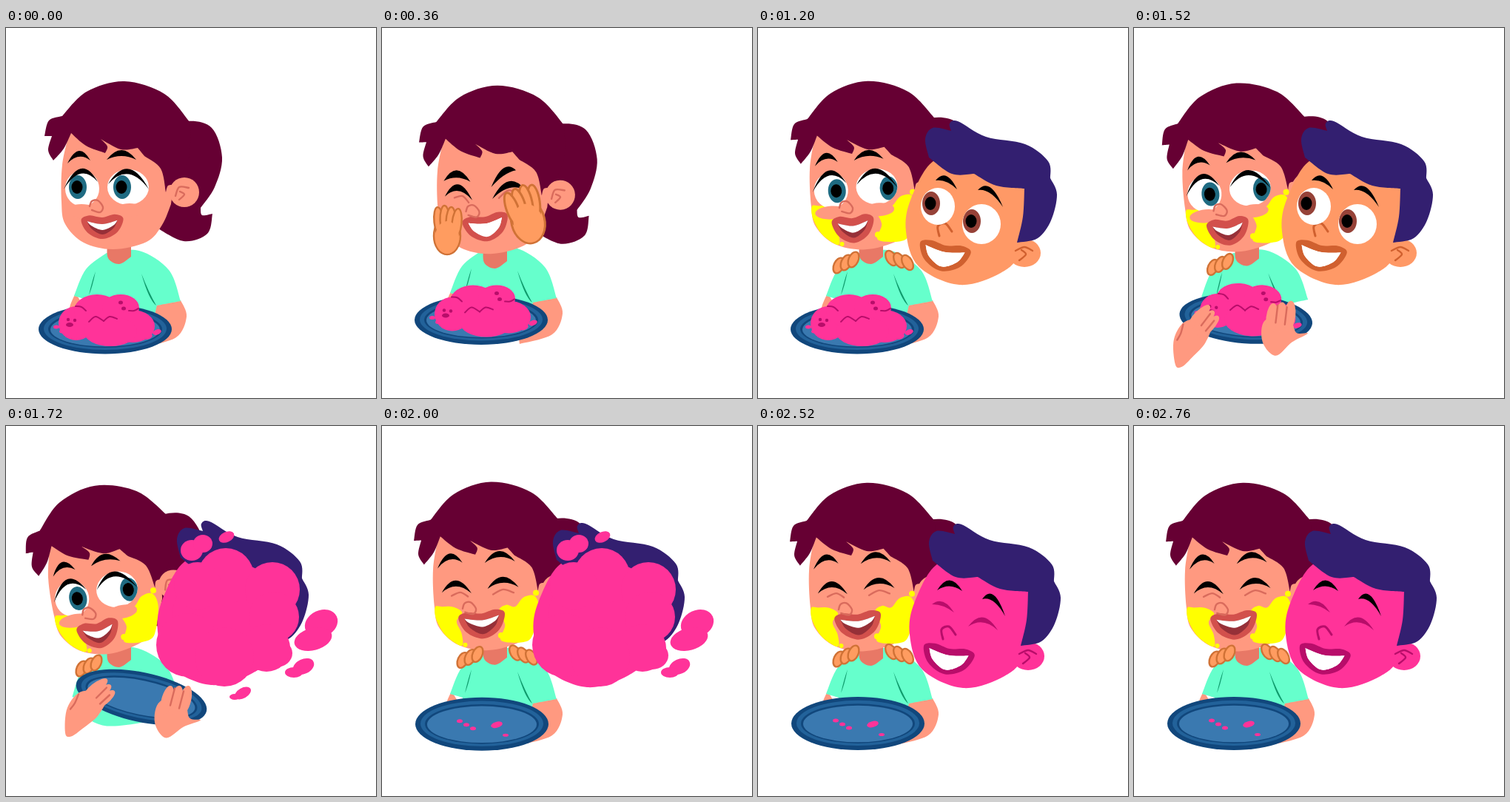
Recreate the animation shown at these times as an HTML page. Size 500 by 500 pixels, loop 2.8 s.

```html
<!DOCTYPE html>
<html lang="en">
<head>
<meta charset="utf-8">
<title>Colour play</title>
<style>
html, body { margin: 0; width: 100%; height: 100%; overflow: hidden; background: #fff; }
svg { display: block; width: 100vw; height: 100vh; }
#boy { --face: #ff9966; --edge: #d0602f; }
#boy.painted { --face: #ff3399; --edge: #b80d6a; }
</style>
</head>
<body>
<svg id="stage" viewBox="0 0 500 500" xmlns="http://www.w3.org/2000/svg"></svg>
<script>
const LOOP = 2800, STEP = 40;
const HAIR = '#660033', SKIN = '#ff9980', SHADE = '#d96b5c', LIP = '#d2504c', MOUTH = '#963038';
const TAN = '#ff9c60', TAN_LINE = '#d07236', PINK = '#ff3399', BERRY = '#b80d6a', SUN = '#ffff00';
const NAVY = '#11477c', BLUE = '#22629a', SKY = '#3a79b0', MINT = '#66ffcc', LEAF = '#0f9b6c', INDIGO = '#331f70';
const FACE = 'var(--face)', EDGE = 'var(--edge)';

// ---- drawing helpers ----
const style = (fill, line, w = 2.4) => `style="fill:${fill};stroke:${line || 'none'};stroke-width:${w};stroke-linecap:round"`;
const group = (id, ...parts) => `<g id="${id}">${parts.join('')}</g>`;
const oval = (fill, x, y, rx, ry = rx, rot = 0, line) =>
  `<ellipse cx="${x}" cy="${y}" rx="${rx}" ry="${ry}" transform="rotate(${rot} ${x} ${y})" ${style(fill, line)}/>`;

// smooth curve through points; a slash marks a sharp corner
function curve(text) {
  const runs = text.split('/').map(run => {
    const n = run.trim().split(/\s+/).map(Number);
    return n.flatMap((v, i) => i % 2 ? [] : [[v, n[i + 1]]]);
  });
  const loop = runs.length === 1;
  let d = `M${runs[0][0]}`, last;
  for (const run of runs) {
    const p = last ? [last, ...run] : run, n = p.length;
    const at = i => loop ? p[(i + n) % n] : p[Math.max(0, Math.min(n - 1, i))];
    for (let i = 0; i < (loop ? n : n - 1); i++) {
      const [a, b, c, e] = [-1, 0, 1, 2].map(k => at(i + k));
      const h1 = b.map((v, k) => v + (c[k] - a[k]) / 6), h2 = c.map((v, k) => v - (e[k] - b[k]) / 6);
      d += `C${h1} ${h2} ${c}`;
    }
    last = p[n - 1];
  }
  return d;
}
const area = (fill, text, line) => `<path d="${curve(text)}Z" ${style(fill, line)}/>`;
const line = (color, text, w) => `<path d="${curve(text + ' /' + text.trim().split(/\s+/).slice(-2).join(' '))}" ${style('none', color, w)}/>`;

// crescent between two points
function arch(x1, y1, x2, y2, rise, thick, fill = '#000') {
  const x = (x1 + x2) / 2, y = (y1 + y2) / 2 - 2 * rise;
  return `<path d="M${x1} ${y1}Q${x} ${y} ${x2} ${y2}Q${x} ${y + 2 * thick} ${x1} ${y1}Z" ${style(fill)}/>`;
}

// eyeball with an iris clipped to it
function eye(id, x, y, rx, ry, ix, iy, color) {
  return `<clipPath id="${id}Clip"><ellipse cx="${x}" cy="${y}" rx="${rx}" ry="${ry}"/></clipPath>` +
    oval('#fff', x, y, rx, ry) +
    `<g clip-path="url(#${id}Clip)">` +
    group(id, oval(color, ix, iy, 12, 16), oval('#000', ix - 1, iy, 7.5, 9)) + '</g>';
}

// smiling mouth hung from the middle of its upper lip
function mouth(id, x, y, w, h, tilt, lip, inside, bite) {
  const a = w / 2, b = a - 8;
  const bowl = (k, c) => `${-b} 5 0 9 ${b} 4 / ${b * .72} ${c * .65} 0 ${c} ${-b * .72} ${c * .65} ${-b} 5 / ${-b} 5`;
  return `<g transform="translate(${x} ${y}) rotate(${tilt})">` + group(id,
    area(lip, `${-a} 3 ${-a * .6} -3 0 0 ${a * .6} -4 ${a} 2 ${a * .7} ${h * .7} 0 ${h} ${-a * .7} ${h * .7}`),
    area(inside, bowl(1, h - 6)), area('#fff', bowl(1, bite))) + '</g>';
}

function hand(id) {
  let s = '';
  for (let i = 0; i < 4; i++) s += oval(TAN, -11 + 8 * i, -13 + 2 * Math.abs(i - 1), 6.5, 20, 4 * i - 6, TAN_LINE);
  return group(id, oval(TAN, 0, 8, 18, 25, 0, TAN_LINE), s, oval(TAN, 0, 10, 16, 22));
}

function row(n, x, y, dx, dy, rx, ry, rot, fill, edge) {
  let s = '';
  for (let i = 0; i < n; i++) s += oval(fill, x + i * dx, y + i * dy, rx, ry, rot, edge);
  return s;
}

// ---- the picture ----
const girlHead = group('head',
  area(SKIN, '86 140 76 185 75 235 80 265 105 290 145 299 190 289 211 266 223 238 / 230 190 / 200 140 / 86 140'),
  area(HAIR, '52 146 58 125 76 119 / 109 86 160 72 214 89 249 128 / 247 175 228 212 / 219 213 216 222 / 209 190 187 173 / 178 162 / 155 164 128 150 / 137 160 134 169 / 108 159 88 142 / 78 163 64 179 / 57 165 62 146 / 52 146'),
  oval(SKIN, 241, 222, 20), line(SHADE, '229 227 234 215 247 216'), line(SHADE, '235 221 241 225 234 232'),
  group('smear', oval(SUN, 100, 264, 18, 36, 8), oval(SUN, 191, 257, 25, 33, -12)),
  group('paint',
    area(SUN, '76 237 86 237 100 238 112 246 104 258 110 275 109 291 89 277 77 255'),
    area(SUN, '162 246 172 239 184 242 196 230 211 229 216 246 208 276 196 290 163 287 169 266'),
    oval(SUN, 213, 225, 4), oval(SUN, 114, 290, 3), oval(SUN, 163, 280, 4)),
  group('openFace',
    arch(83, 183, 114, 179, 15, 8), arch(136, 178, 176, 178, 13, 8),
    eye('irisL', 103, 217, 23, 24, 97, 215, '#1f6b82'), eye('irisR', 165, 215, 28, 24, 157, 215, '#1f6b82'),
    oval(SKIN, 102, 247, 22, 9), oval(SKIN, 167, 246, 20, 9),
    arch(78, 218, 124, 208, 23, 7), arch(138, 211, 193, 218, 24, 7)),
  mouth('smile', 130, 256, 57, 29, -1, LIP, MOUTH, 17),
  group('squintFace',
    group('squeezeL', arch(84, 199, 120, 201, 15, 10), arch(85, 220, 122, 226, 19, 9), line(SHADE, '98 222 109 220 117 229')),
    group('squeezeR', arch(148, 209, 182, 187, 14, 10), arch(149, 225, 193, 213, 17, 9), line(SHADE, '158 224 171 214 186 219')),
    mouth('grin', 138, 249, 62, 33, -7, LIP, '#fff', 26)),
  group('laughFace',
    arch(82, 185, 116, 179, 16, 8), arch(146, 181, 187, 181, 15, 8),
    arch(86, 218, 126, 221, 17, 8), arch(148, 216, 190, 216, 15, 8),
    line(SHADE, '99 223 111 219 121 225'), line(SHADE, '155 224 169 218 183 223'),
    mouth('laugh', 138, 249, 63, 34, -2, LIP, MOUTH, 18)),
  line(SHADE, '113 241 116 234 124 233 131 242 127 249 116 246'));

const body = group('body',
  group('restArms',
    area(SKIN, '204 362 / 236 368 / 244 390 230 418 186 431 / 182 395 / 204 362'),
    area(SKIN, '94 358 / 86 378 88 394 / 112 388 / 94 358')),
  area(MINT, '136 304 108 326 92 362 / 109 367 / 110 390 130 403 160 405 194 399 204 375 / 236 369 / 220 327 180 301 136 304'),
  arch(112, 361, 121, 329, 2, 5, LEAF), arch(183, 332, 203, 375, -2, 5, LEAF));

const plate = group('plate',
  group('dish', oval(NAVY, 0, 0, 90, 33.5), oval(BLUE, 0, -.5, 83, 28.5), oval(NAVY, 0, 0, 77, 25), oval(SKY, 0, .5, 74, 23)),
  group('crumbs', row(3, -30, -4, 9, 5, 4, 2.5, 0, PINK), oval(PINK, 20, 1, 8, 4, -15), oval(PINK, 32, 15, 4, 2)),
  group('pile',
    row(3, -66, -3, 8, 6, 4, 2.5, 0, PINK), row(2, 70, 4, -12, 6, 6, 3.5, -20, PINK),
    oval(PINK, -39, -8, 24, 23), oval(PINK, -11, -25, 31, 22), oval(PINK, 21, -29, 25, 18),
    oval(PINK, 37, -4, 30, 22), oval(PINK, 7, 3, 36, 20),
    line(BERRY, '-40 -31 -32 -30 -26 -25', 2), line(BERRY, '-22 -10 -13 -17 -2 -11', 2),
    line(BERRY, '-2 -11 6 -17 16 -14', 2), line(BERRY, '45 -28 39 -25 32 -25', 2),
    oval(BERRY, -48, -6, 5, 3), row(2, -50, -13, 9, 1, 2.2, 2.2, 0, BERRY), row(2, 21, -36, 4, 8, 3, 2.5, 0, BERRY)));

const throwHands = group('throwHands',
  area(SKIN, '80 414 83 380 103 358 135 365 125 390 104 408 88 419'),
  row(3, 121, 354, 5, 8, 20, 7, -38, SKIN), line(SHADE, '136 353 122 367'), line(SHADE, '140 363 127 375'), line(SHADE, '98 362 93 374 87 382'),
  area(SKIN, '201 400 208 372 240 372 248 394 263 397 240 406 216 421'),
  row(3, 218, 370, 12, 0, 8, 20, 14, SKIN), line(SHADE, '228 354 222 377'), line(SHADE, '240 358 234 381'));

const boy = group('boy',
  oval(FACE, 360, 304, 22, 19),
  area(FACE, '240 178 207 230 200 275 217 322 272 347 328 331 354 300 362 220 300 180'),
  line(EDGE, '348 301 360 296 371 301'), line(EDGE, '356 300 362 306 353 314'),
  area(INDIGO, '231 175 226 150 236 135 261 139 / 259 129 270 126 308 147 361 157 392 180 395 203 / 404 225 396 260 378 284 350 290 / 358 255 360 217 / 322 213 292 197 / 262 197 231 175'),
  line(EDGE, '245 281 243 268 253 264 262 275', 3),
  mouth('boySmile', 254, 294, 70, 35, 12, EDGE, '#fff', 29),
  group('boyOpen', arch(240, 206, 269, 218, 12, 8), arch(297, 219, 331, 242, 15, 8),
    eye('boyL', 243, 241, 23, 25, 234, 237, '#964238'), eye('boyR', 302, 265, 26, 27, 289, 261, '#964238')),
  group('boyLaugh', arch(237, 215, 271, 216, 14, 8), arch(298, 227, 329, 250, 17, 9),
    arch(230, 234, 260, 245, 9, 6, EDGE), arch(279, 264, 319, 269, 15, 7, EDGE)));

const splat = group('splat',
  oval(PINK, 302, 262, 78), oval(PINK, 297, 203, 38), oval(PINK, 360, 221, 37), oval(PINK, 259, 216, 32),
  oval(PINK, 362, 258, 34), oval(PINK, 246, 296, 43), oval(PINK, 352, 300, 32), oval(PINK, 295, 312, 40),
  oval(PINK, 251, 168, 15, 14), oval(PINK, 266, 159, 13, 12), oval(PINK, 298, 150, 11, 7, -25),
  oval(PINK, 426, 267, 23, 18, -25), oval(PINK, 415, 288, 26, 15, -15),
  oval(PINK, 402, 325, 15, 10, -25), oval(PINK, 389, 333, 12, 7));

document.getElementById('stage').innerHTML = [
  group('behind'),
  group('backHair', area(HAIR, '215 140 / 245 126 278 135 292 175 282 215 263 243 / 265 253 279 251 / 272 278 240 288 204 270 / 215 140')),
  body, group('neck', area('#e87866', '137 290 / 138 311 153 319 169 309 / 169 290 / 137 290')),
  girlHead, hand('rubL'), hand('rubR'),
  group('gripL', row(3, 109, 321, 10, -4, 6.5, 11, 24, TAN, TAN_LINE)),
  group('gripR', row(3, 180, 311, 11, 3, 6.5, 11, -30, TAN, TAN_LINE)),
  group('front', boy), plate, throwHands, splat,
  group('drop', oval(PINK, 320, 361, 12, 7, -30), oval(PINK, 309, 366, 7, 4))
].join('');

// ---- motion helpers ----
const el = id => document.getElementById(id);
const show = (id, on) => { el(id).style.display = on ? '' : 'none'; };
const put = (id, x, y, rot = 0, sx = 1, sy = sx, px = 0, py = 0) =>
  el(id).setAttribute('transform', `translate(${x + px} ${y + py}) rotate(${rot}) scale(${sx} ${sy}) translate(${-px} ${-py})`);
const part = (t, a, b) => Math.max(0, Math.min(1, (t - a) / (b - a)));
const ramp = (t, a, b) => { const p = part(t, a, b); return p * p * (3 - 2 * p); };
const bump = (t, a, b) => Math.sin(Math.PI * part(t, a, b));

function draw(now) {
  const t = Math.floor((now % LOOP) / STEP) * STEP;
  const squint = ramp(t, 120, 280) - ramp(t, 1040, 1200);
  const toss = ramp(t, 1440, 1640) - ramp(t, 1760, 1920);
  const settle = ramp(t, 1760, 1920);
  const laugh = settle * (.5 + .5 * Math.cos((Math.max(t, 2000) - 2280) / 120 * Math.PI));
  const shut = t >= 160 && t < 1080, merry = t >= 1960;

  // girl
  const turn = -1.5 * ramp(t, 120, 280) - 1.5 * ramp(t, 1040, 1160) - 7 * toss - 2.5 * bump(t, 1560, 1720);
  const hx = 2 * squint - settle, hy = 6 * squint + 7 * toss + 5 * laugh;
  for (const id of ['head', 'backHair']) put(id, hx, hy, turn, 1, 1, 150, 300);
  put('neck', 0, hy);
  put('body', 0, -4 * squint, -4 * toss, 1, 1, 150, 400);
  show('openFace', !shut && !merry);
  show('smile', !shut && !merry);
  show('squintFace', shut);
  show('laughFace', merry);
  const gaze = t >= 1080 ? 1 : 0;
  put('irisL', 14 * gaze, 3 * gaze);
  put('irisR', 24 * gaze, 3 * gaze);
  put('smile', 0, 0, 0, 1, 1 + .15 * gaze);

  // hands rubbing colour on the cheeks
  const rub = bump(t, 360, 640) + ramp(t, 720, 920);
  const away = 1 - ramp(t, 200, 320) + ramp(t, 940, 1080);
  put('rubL', 88 + 4 * rub + 12 * away, 273 - 28 * rub + 100 * away, 4 * rub, 1 - .5 * away);
  put('rubR', 195 + 11 * rub - 20 * away, 252 + 26 * rub + 100 * away, -14, -1.25 + .6 * away, 1.2 - .6 * away);
  show('rubL', away < 1);
  show('rubR', away < 1);
  put('squeezeL', 0, -7 * rub);
  put('squeezeR', 0, 2 * rub);
  show('smear', t > 380 && shut);
  put('smear', 0, 0, 0, 1, ramp(t, 380, 520), 0, 260);
  show('paint', t >= 1080);

  // plate and throw
  const px = 134 + 49 * toss + settle, py = 407 - 12.5 * squint - 40.5 * toss - 2 * settle - 3 * laugh;
  put('plate', px, py, 12 * toss);
  put('dish', 0, 0, 0, 1, 1 + .075 * settle);
  const fly = ramp(t, 1540, 1660);
  put('pile', 130 * fly, -125 * fly, 0, 1 + .3 * fly);
  show('pile', fly < 1);
  show('crumbs', t >= 1880);
  const hold = toss > .1;
  show('restArms', !hold);
  show('throwHands', hold);
  put('throwHands', px - 183, py - 366, 12 * toss - 12, 1, 1, 183, 366);

  // boy
  const hide = 1 - ramp(t, 720, 1160), hit = ramp(t, 1600, 1720);
  const layer = el(t < 1040 ? 'behind' : 'front');
  if (el('boy').parentNode !== layer) layer.appendChild(el('boy'));
  show('boy', t >= 760);
  put('boy', -144 * hide + 5 * hit, Math.min(74, 130 * hide) + 3 * hit + 4 * laugh, 13 * hide, 1 - .23 * hide, 1 - .23 * hide, 300, 240);
  el('boy').setAttribute('class', hit === 1 ? 'painted' : '');
  show('boyOpen', hit < 1);
  show('boyLaugh', hit === 1);
  const gy = 7 * toss - 6 * laugh;
  put('gripL', -7 * toss, gy);
  put('gripR', 0, gy);
  show('gripL', t >= 1080);
  show('gripR', t >= 1080 && !hold);

  // splash
  const size = ramp(t, 1580, 1680) * (1 + .15 * bump(t, 1640, 1720)) - ramp(t, 2000, 2200);
  show('splat', t >= 1640 && size > 0);
  put('splat', 0, 0, 0, size, size, 300, 265);
  show('drop', t >= 1680 && t < 1880);
  put('drop', 0, 100 * part(t, 1720, 1840) ** 2);
}

let start;
function tick(now) {
  start ??= now;
  draw(Math.max(0, now - start));
  requestAnimationFrame(tick);
}
draw(0);
requestAnimationFrame(tick);
</script>
</body>
</html>
```
